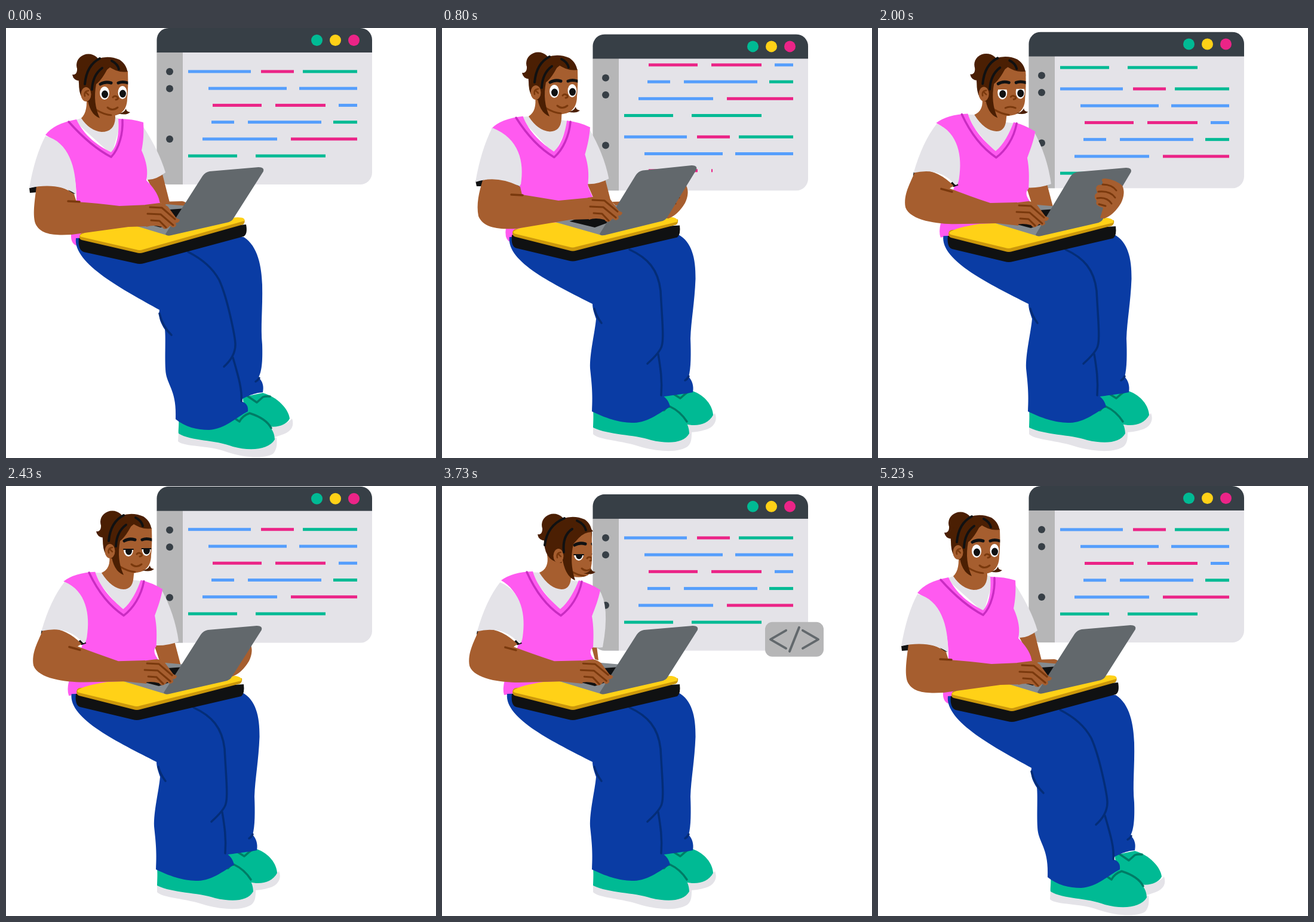
An HTML page with a canvas that plays this animation: 720 by 720 pixels, repeating every 5310 ms.

```html
<!DOCTYPE html>
<html lang="en">
<head>
<meta charset="utf-8">
<title>Coding at a laptop</title>
<style>
html, body { margin: 0; width: 100%; height: 100%; overflow: hidden; background: #fff; }
canvas { display: block; width: 100%; height: 100%; }
</style>
</head>
<body>
<canvas width="720" height="720"></canvas>
<script>
const ctx = document.querySelector('canvas').getContext('2d');
const LOOP = 5310;
const C = {
  skin: '#a65e2f', skinLine: '#7a390d', hair: '#4b1f03', black: '#101112',
  pink: '#ff5af0', pinkLine: '#c92cc2', shirt: '#e4e3e8', blue: '#0a3ca4', blueLine: '#042d78',
  green: '#00ba94', greenLine: '#007c66', yellow: '#ffd117', yellowSide: '#cc980b',
  screen: '#62686c', base: '#858b90', bar: '#373f46', side: '#b6b6b7',
  link: '#559efc', rose: '#eb2487'
};

// Eased value through [time, value] stops.
function key(t, stops, linear) {
  if (t <= stops[0][0]) return stops[0][1];
  for (let i = 1; i < stops.length; i++) {
    const [t0, v0] = stops[i - 1], [t1, v1] = stops[i];
    if (t <= t1) {
      const p = (t - t0) / (t1 - t0);
      return v0 + (v1 - v0) * (linear ? p : p * p * (3 - 2 * p));
    }
  }
  return stops[stops.length - 1][1];
}

// Weighted mix of paths that share one structure.
const NUM = /-?\d+(\.\d+)?/g;
function mix(weights, ...paths) {
  const values = paths.map(p => p.match(NUM));
  let i = 0;
  return new Path2D(paths[0].replace(NUM, () => {
    const sum = weights.reduce((s, w, n) => s + w * values[n][i], 0);
    i++;
    return sum.toFixed(2);
  }));
}

const asPath = p => typeof p === 'string' ? new Path2D(p) : p;
function fill(color, path) { ctx.fillStyle = color; ctx.fill(asPath(path)); }
function line(color, width, path) {
  ctx.strokeStyle = color;
  ctx.lineWidth = width;
  ctx.stroke(asPath(path));
}
function oval(color, x, y, rx, ry = rx) {
  ctx.fillStyle = color;
  ctx.beginPath();
  ctx.ellipse(x, y, rx, ry, 0, 0, 7);
  ctx.fill();
}
function group(x, y, draw) {
  ctx.save();
  ctx.translate(x, y);
  draw();
  ctx.restore();
}

const { link, rose, green } = C;
const ROWS = [
  [[link, 305, 410], [rose, 427, 482], [green, 497, 588]],
  [[link, 339, 470], [link, 491, 588]],
  [[rose, 346, 428], [rose, 451, 535], [link, 557, 588]],
  [[link, 344, 382], [link, 405, 528], [green, 548, 588]],
  [[link, 329, 454], [rose, 477, 588]],
  [[green, 305, 387], [green, 418, 535]]
];

function codeRow(row, y, shown) {
  const start = row[0][1], end = row[row.length - 1][2];
  const limit = start + (end - start) * shown;
  for (const [color, x0, x1] of row) {
    if (limit <= x0) continue;
    ctx.fillStyle = color;
    ctx.fillRect(x0, y - 2.5, Math.min(x1, limit) - x0, 5);
  }
}

function codeWindow(t) {
  ctx.save();
  ctx.beginPath();
  ctx.roundRect(252.5, 0, 360.5, 262, 20);
  ctx.clip();
  ctx.fillStyle = C.shirt;
  ctx.fillRect(252, 0, 362, 262);
  const shift = key(t, [[0, 0], [800, 78], [1530, 129], [2430, 178], [2650, 177]], true);
  const typed = key(t, [[50, 0], [800, 2.44], [1530, 4.2], [2350, 6]], true);
  ROWS.forEach((row, i) => {
    const y = 73 + 28.25 * i - shift;
    codeRow(row, y, 1);
    codeRow(row, y + 177, Math.max(0, Math.min(1, typed - i)));
  });
  ctx.fillStyle = C.side;
  ctx.fillRect(252, 40, 44, 222);
  ctx.fillStyle = C.bar;
  ctx.fillRect(252, 0, 362, 41);
  ctx.restore();
  for (const y of [73, 101.5, 186]) oval(C.bar, 274, y, 6);
  oval(C.green, 520.5, 20.5, 9.5);
  oval(C.yellow, 551.5, 20.5, 9.5);
  oval(C.rose, 582.5, 20.5, 9.5);
}

function badge(t) {
  const size = key(t, [[2800, 0], [2930, .9], [3080, 1.93], [3350, .92], [3600, 1.07], [3720, 1],
    [4800, 1], [4950, 1.96], [5150, 0]]);
  if (size < .01) return;
  group(590, 243, () => {
    ctx.scale(size, size);
    ctx.fillStyle = C.side;
    ctx.beginPath();
    ctx.roundRect(-49, -29, 98, 58, 12);
    ctx.fill();
    line(C.screen, 4, 'M-14 -15L-40 0L-14 15M8 -20L-8 20M14 -15L40 0L14 15');
  });
}

function legs(front, backFoot, body) {
  const f = [front, 1 - front], b = [backFoot, 1 - backFoot];
  const hip = `M${109 + 8 * body} ${348 + 4 * body}C${104 + 8 * body} ${390 + 5 * body}`;
  fill(C.shirt, mix(b,
    'M430 668Q465 670 479 654C483 666 478 675 465 680Q455 684 445 686Z',
    'M400 658Q440 664 457 645C462 657 456 669 440 673Q428 677 412 677Z'));
  fill(C.green, mix(b,
    'M396 618L430 611C455 618 473 638 475 654C468 668 445 671 430 664L400 640Z',
    'M366 616L420 608C440 615 453 632 454 648C446 664 425 668 408 663L380 640Z'));
  line(C.greenLine, 3.5, mix(b,
    'M404 616L420 627L430 618Q435 616 442 617',
    'M388 613L399 620L407 613Q410 610 416 608'));
  fill(C.blue, mix(f,
    'M220 350L398 350C422 365 428 400 429 430C430 470 426 500 429 530C430 560 428 575 423 585C430 592 432 600 430 610C420 611 408 613 386 627C380 600 376 580 370 552L300 400Z',
    'M220 350L396 346C418 358 425 385 424.500 420C423 460 417 490 416 520C417 545 417 570 413 584C419 590 422 600 420 610C405 613 390 614 360 619C358 590 356 570 352 546L300 400Z'));
  line(C.blueLine, 3.5, mix(f, 'M418 592Q422 590 424 586', 'M407 590Q411 588 413 583'));
  fill(C.shirt, mix(f,
    'M289 677L288 692C298 702 340 698 370 710C405 722 440 720 448 712C454 704 454 696 453 686L420 690Z',
    'M253 668L253 680C262 690 300 690 335 702C370 711 400 710 412 700C418 694 418 686 418 676L380 680Z'));
  fill(C.green, mix(f,
    'M289 655C290 665 288 675 289 679C310 692 350 689 380 701C410 709 440 706 450 689C450 668 430 655 410 642L350 630Z',
    'M253 640C254 650 253 665 253 669C280 682 320 680 350 690C380 697 405 695 414 679C414 660 400 645 380 632L320 620Z'));
  line(C.greenLine, 3.5, mix(f,
    'M385 655L391 659Q396 649 408 645C430 652 440 662 444 670',
    'M366 640L372 640Q376 634 382 634C395 640 403 648 410 659'));
  fill(C.blue, mix(f,
    hip + ' 200 440 257 472C256 480 255 488 266 505C268 520 265 560 268 580C272 600 286 610 284 655C300 668 320 673 340 673C368 671 385 652 405 642C406 632 402 628 394 625L380 552C390 530 376 460 357 422C345 400 325 385 305 375L220 345Z',
    hip + ' 190 430 252 462C252 470 255 478 258 487C256 510 247 545 248 570C250 590 253 610 251 642C280 656 300 661 322 661C345 660 362 646 382 634C380 626 376 619 368 615L362 546C374 530 368 480 367 440C362 405 345 385 314 371L220 345Z'));
  line(C.blueLine, 3.5, mix(f,
    'M305 375C325 385 345 400 357 422C372 455 384 520 384 530Q384 550 365 567M380 552C388 580 396 605 394 625M257 478Q262 500 277 514',
    'M314 371C345 385 362 405 366 440C368 480 372 520 368 532Q366 542 344 562M362 546C366 570 369 590 367 615M255 470Q258 482 267 494'));
}

function board(k) {
  const w = [k, 1 - k];
  fill(C.black, mix(w,
    'M122 352L402 329Q405 345 398 349L231 394Q224 396 217 394L130 375Q120 371 122 352Z',
    'M117 348L398 332Q400 347 394 352L226 391Q219 393 212 391L124 370Q115 367 117 348Z'));
  fill(C.yellowSide, mix(w,
    'M123 350Q123 344 129 343L399 320Q401 326 397 329L230 376Q224 378 218 376L127 355Q123 354 123 350Z',
    'M118 345Q118 339 124 338L395 322Q396 328 392 331L225 374Q219 376 213 374L122 351Q118 349 118 345Z'));
  fill(C.yellow, mix(w,
    'M124 347Q135 339 175 333L388 317Q401 317 399 323L229 371Q224 373 218 371L127 350Q123 349 124 347Z',
    'M120 342Q130 334 170 328L384 318Q396 320 394 326L224 368Q219 370 213 368L122 346Q118 344 120 342Z'));
}

function laptop(k, tilt, angle) {
  group(274 + k * 3, 346 - k, () => {
    ctx.rotate(angle);
    ctx.translate(-274, -346);
    fill(C.base, 'M190 325L266 348L274 348L312 300L266 296Z');
    fill(C.black, 'M214 324L256 335L285 325L298 303L270 305Z');
    ctx.transform(1, 0, tilt * .08, 1, -tilt * .08 * 348, 0);
    fill(C.screen, 'M264 346L326 249Q331 242 338 241L420 234Q430 234 428 241L379 318Q375 326 366 327L274 348Q266 350 264 346Z');
  });
}

function holdingHand() {
  fill(C.skin, 'M376 258Q372 251 381 252Q398 254 409 264Q415 276 407 293Q395 313 379 319L372 318L377 301Q362 297 366 290L363 284Q362 278 367 276L365 268Q367 261 376 263Z');
  line(C.skinLine, 3, 'M376 262Q392 262 399 272M369 274Q389 272 397 284M367 285Q383 282 391 294M370 295L381 298');
}

function torso(u, e) {
  const w = [u, 1 - u], right = [u, 1 - u - e, e];
  fill(C.skin, mix(right,
    'M236 252L262 245L274 292L258 294Z',
    'M249 267L284 262L294 300L258 296Z',
    'M250 268L259 268L262 292L256 290Z'));
  fill(C.shirt, mix(right,
    'M229 164Q256 205 267 242Q250 255 236 254L225 205Z',
    'M262 172Q285 215 291 262Q272 269 250 268L250 215Z',
    'M262 172Q282 200 269 270Q262 271 250 270L250 215Z'));
  fill(C.shirt, mix(w,
    'M114 155L126 151L184 150L194 153L177 212Z',
    'M144 144L163 145L215 158L232 160L199 212Z'));
  fill(C.skin, mix(w,
    'M134 110Q138 140 126 151Q140 172 160 174Q182 174 183 150L182 115Z',
    'M176 115Q180 138 163 145Q180 172 200 173Q214 173 216 155L220 120Z'));
  fill(C.pink, mix(w,
    'M66 179Q80 160 118 153C130 180 155 198 176 208C186 198 190 175 188 152Q212 152 230 158C231 175 230 190 227 205C236 225 238 240 235 255C245 265 255 278 257 290L258 294L258 325L120 365Q108 362 109 346L118 290C119 240 105 200 66 179Z',
    'M99 158Q118 144 152 143C160 170 180 190 198 206C212 195 222 175 229 158Q248 163 265 174C262 190 256 205 251 218C254 235 254 250 253 270C246 275 248 282 254 290L258 296L258 325L104 350Q101 340 105 325L134 250C140 215 130 175 99 158Z'));
  line(C.pinkLine, 3.5, mix(w,
    'M105 157C130 185 155 205 176 216C190 202 196 175 195 154',
    'M142 144C158 180 178 203 199 217C215 205 229 185 234 160'));
}

function typingArm(a, b, t) {
  const c = 1 - a - b, w = [a, b, c];
  fill(C.black, mix(w,
    'M39 268L40 276L53 275L55 264Z',
    'M56 256L58 265L68 265L70 254Z',
    'M60 241L59 247L63 247L66 240Z'));
  fill(C.black, mix(w,
    'M100 266L113 272L116 278L108 276Z',
    'M120 258L128 256L132 262L128 266Z',
    'M120 262L128 254L135 263L127 266Z'));
  fill(C.skin, mix(w,
    'M51 264C49 285 44 310 49 327C58 348 85 347 110 346L205 333L240 332L238 296L190 298Q150 293 118 291L114 278Q85 258 51 264Z',
    'M68 255C62 275 57 295 61 315C70 337 100 337 125 336L215 321L250 320L248 284L195 289Q165 284 134 279L131 266Q95 245 68 255Z',
    'M62 240C54 260 42 278 46 300C54 322 100 328 130 328L200 327L235 331L233 292L188 293Q150 280 120 268L127 264Q95 232 62 240Z'));
  fill(C.shirt, mix(w,
    'M66 181C105 190 118 235 117 277Q117 279 115 277Q85 258 39 268Q48 215 66 181Z',
    'M84 167C130 185 138 225 132 262Q130 266 128 264Q90 246 56 258Q65 205 84 167Z',
    'M99 160C135 175 142 215 136 252Q134 265 129 262Q104 232 60 242Q75 190 99 160Z'));
  line(C.skinLine, 3.5, mix(w, 'M104 290L123 291', 'M116 279L135 280', 'M106 269L124 274'));
  const tap = Math.sin(t / LOOP * Math.PI * 48);
  group(a * 241 + b * 252 + c * 236, a * 315 + b * 303 + c * 312, () => {
    fill(C.skin, 'M-8 -19L16 -22Q22 -22 30 -16L44 3L50 6Q49 12 43 11L44 16Q39 22 34 16L30 20Q24 24 20 18Q5 14 -6 18Z');
    line(C.skinLine, 3, mix([1 - tap * .1, tap * .1],
      'M0 -15L20 -14L42 5M-4 -4L18 -3L39 15M2 7L16 8L27 19',
      'M0 -15L20 -14L42 15M-4 -4L18 -3L37 25M2 7L16 8L26 12'));
  });
}

function eye(x, y, rx, open) {
  ctx.save();
  ctx.beginPath();
  ctx.rect(x - 12, y + 11 - 22 * open, 24, 23);
  ctx.clip();
  oval('#fff', x, y, rx, 11);
  oval(C.black, x + .5, y + 2, 5.5, 6.5);
  ctx.restore();
  if (open < .7) line(C.black, 2, `M${x - rx} ${y + 11 - 22 * open}h${rx * 2}`);
}

function head(x, y, turn, open, smile) {
  const w = [1 - turn, turn];
  group(x, y, () => {
    oval(C.hair, 138, 62, 20, 18.5);
    fill(C.hair, 'M119 66Q120 79 111 78Q113 90 128 88L138 76Z');
    fill(C.hair, mix(w,
      'M122 92Q119 75 137 59Q165 42 190 53Q204 62 204 80L200 110L140 124Q122 123 122 92Z',
      'M122 92Q119 75 137 59Q165 42 190 53Q203 62 202 80L200 110L155 126Q124 126 122 92Z'));
    const face = mix(w,
      'M148 86L174 66Q190 74 204 73Q205 100 203 118Q203 136 190 144Q170 152 150 143Q136 134 140 110Z',
      'M162 104L180 84Q190 74 201 74Q203 100 202 118Q202 136 196 146Q180 154 160 145Q148 134 152 110Z');
    fill(C.skin, face);
    ctx.save();
    ctx.clip(face);
    ctx.translate(15 * turn, 2 * turn);
    eye(165, 109, 8, open);
    eye(195 - 14 * turn * (1 - turn), 108, 7.5, open);
    line(C.black, 5, 'M158 94Q166 89 176 92M188 92Q195 89 204 92');
    line(C.skinLine, 3, `M179 116Q182 112 187 116Q189 119 184 120M170 ${134 - smile}Q178 ${134 + 6 * smile} 187 ${134 - smile}M151 137Q164 145 176 146`);
    ctx.restore();
    fill(C.hair, mix(w,
      'M174 60Q162 86 151 94Q145 125 157 151Q139 144 136 114L140 84Q145 62 174 60Z',
      'M194 62Q180 80 171 94Q164 125 174 155Q156 148 152 114L152 84Q156 62 194 62Z'));
    fill(C.hair, 'M172 57Q194 59 204 73Q187 76 172 64ZM188 143Q197 143 201 135Q201 140 208 141Q201 147 188 143Z');
    group(12 * turn, 3 * turn, () => {
      oval(C.skin, 134, 111, 8.5, 12);
      line(C.skinLine, 2.5, 'M132 114Q130 106 138 105M134 108L138 112');
    });
    line(C.black, 4, mix(w,
      'M132 94Q135 62 157 51M144 103Q145 79 161 67M177 55Q187 60 189 69',
      'M123 96Q127 63 156 51M155 108Q152 80 169 69M177 55Q190 61 192 71'));
  });
}

function draw(t) {
  const floatY = key(t, [[0, 0], [1200, 14], [1350, 14], [2600, 0], [3800, 14], [3900, 14], [5230, 0]]);
  const body = key(t, [[0, 1], [700, .5], [850, .48], [1480, 0], [2430, .08], [3000, 0], [4500, 0], [5200, 1]]);
  const front = key(t, [[0, 1], [620, 0], [4080, 0], [4560, .96], [4780, 1]]);
  const backFoot = key(t, [[0, 1], [650, 0], [4150, 0], [4530, .55], [4800, 1]]);
  const lift = key(t, [[0, 0], [700, -1.5], [1400, 0], [4130, 0], [4530, -3.5], [4950, 0]]);
  const tilt = key(t, [[1000, 0], [1450, 1], [1700, 1], [2300, 0]]);
  const reach = key(t, [[2550, 0], [3200, 1], [4550, 1], [5000, 0]]);
  const armBack = key(t, [[0, 1], [700, 0], [4450, .06], [5180, 1]]);
  const armMid = key(t, [[0, 0], [700, 1], [850, 1], [1160, -.65], [1500, 0]]);
  const grip = key(t, [[150, 0], [650, 1], [2500, 1], [2900, 0]]);
  const headX = key(t, [[0, 0], [800, 23], [1530, 47], [2430, 40], [3600, 49], [3800, 49], [4530, 44], [5200, 0]]);
  const headY = key(t, [[0, 0], [800, -3], [1530, 1], [2430, -2], [3730, 3], [4530, 1], [5200, 0]]);
  const turn = key(t, [[2600, 0], [3200, 1], [3900, 1], [4500, .68], [5150, 0]]);
  const open = key(t, [[950, 1], [1300, .75], [2300, .75], [2400, .55], [2500, .55], [3000, .9], [3600, .45], [3850, .45], [4200, 1]]);
  const smile = key(t, [[1000, 1], [1350, -.8], [1900, -.8], [2300, 1]]);

  ctx.fillStyle = '#fff';
  ctx.fillRect(0, 0, 720, 720);
  ctx.lineCap = ctx.lineJoin = 'round';

  group(0, floatY, () => {
    codeWindow(t);
    badge(t);
  });
  const gripping = () => group(-55 * (1 - grip), 5 * (1 - grip), holdingHand);
  const inFront = t > 1250 && t < 2150;

  torso(body, reach * (1 - body));
  head(headX, headY, turn, open, smile);
  legs(front, backFoot, body);
  group(0, lift, () => board(front));
  group(52 * (1 - body), 0, () => fill(C.skin, 'M258 291L295 290Q306 292 304 300L266 300Z'));
  if (!inFront && grip > 0) gripping();
  group(0, lift, () => laptop(front, tilt, lift * .0125));
  if (inFront) gripping();
  typingArm(armBack, armMid, t);
}

function tick(now) {
  draw(now % LOOP);
  requestAnimationFrame(tick);
}
draw(0);
requestAnimationFrame(tick);
</script>
</body>
</html>
```
